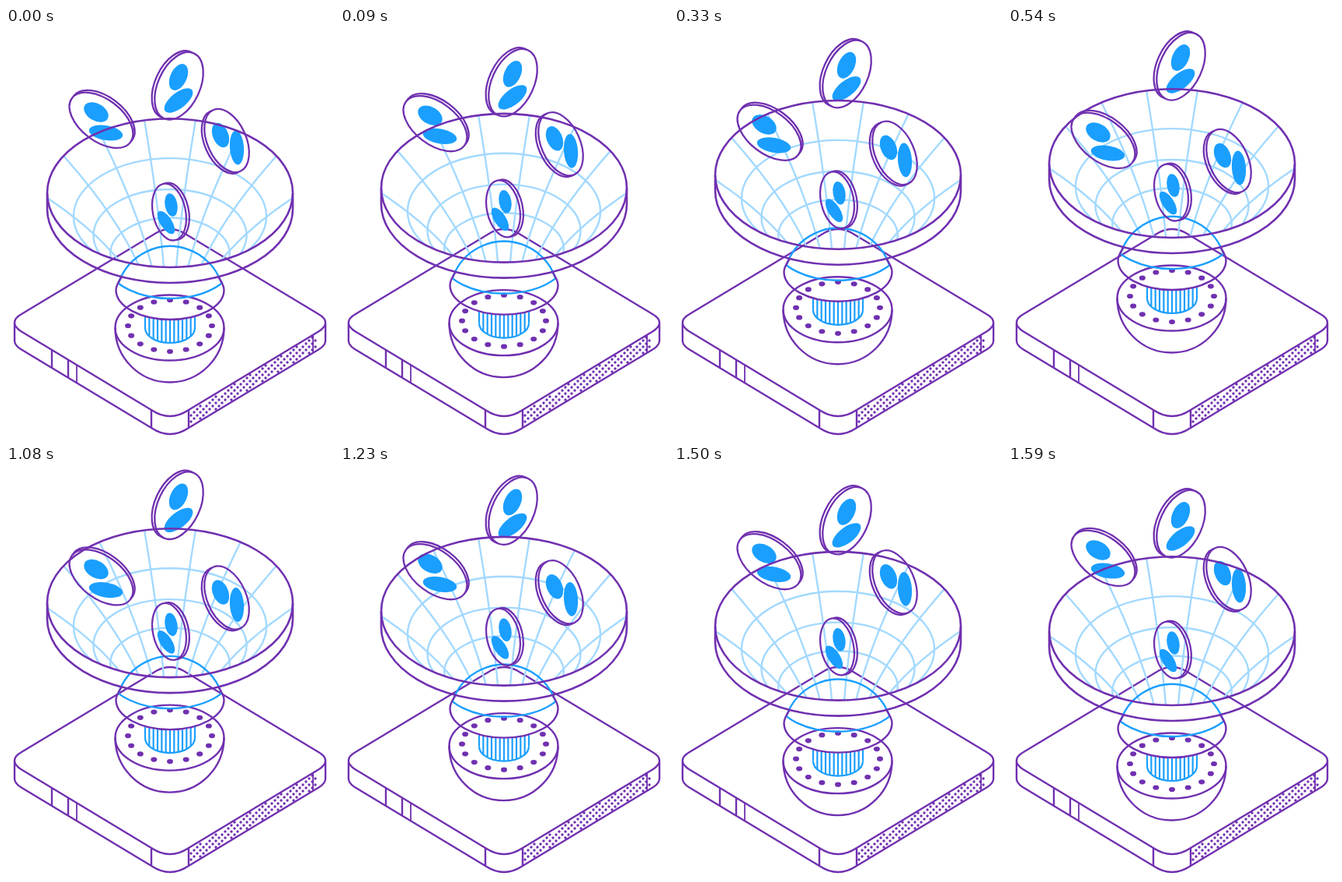
An HTML page with a canvas that plays this animation: 422 px wide and 526 px high, repeating every 1650 ms.

```html
<!DOCTYPE html>
<html lang="en">
<head>
<meta charset="utf-8">
<title>Data funnel</title>
<style>
html, body { margin: 0; width: 100%; height: 100%; overflow: hidden; background: #fff; }
canvas { display: block; width: 422px; height: 526px; }
</style>
</head>
<body>
<canvas id="stage"></canvas>
<script>
const W = 422, H = 526, LOOP = 1650, TICK = 30, STEPS = 18;
const PURPLE = '#7030b0', BLUE = '#1a9fff', PALE = '#a3d9ff';
const CX = 211, RIM_Y = 211.6, RAD = Math.PI / 180;

const canvas = document.getElementById('stage');
const ctx = canvas.getContext('2d');
const dpr = window.devicePixelRatio || 1;
canvas.width = W * dpr;
canvas.height = H * dpr;

// x, y, half length, half width, tilt in degrees; `depth` shifts the rear face along the short axis
const coins = [
  { face: [222.5, 74.3, 46, 27, -65], depth: -4, travel: -25,
    head: [222, 63, 18, 10.5, -65], body: [222, 93, 22, 10, -38] },
  { face: [122.5, 118.3, 47, 27, 37], depth: 3.6, travel: 26,
    head: [116, 108, 17, 11, 30], body: [128.5, 134.5, 22, 9.5, 10] },
  { face: [284, 144.5, 43, 25, 66], depth: -3.8, travel: 26,
    head: [276, 137.5, 16.5, 10, 68], body: [297, 153.5, 22, 9, 86] },
  { face: [210, 236, 37, 21, 78], depth: 4, travel: -25,
    head: [212.5, 227, 15, 8, 80], body: [206, 249.5, 17, 7.5, 57] }
];

function pen(color, width) {
  ctx.strokeStyle = color;
  ctx.lineWidth = width;
}

function line(x1, y1, x2, y2) {
  ctx.beginPath();
  ctx.moveTo(x1, y1);
  ctx.lineTo(x2, y2);
  ctx.stroke();
}

function arc(x, y, rx, ry, from = 0, to = 360) {
  ctx.beginPath();
  ctx.ellipse(x, y, rx, ry, 0, from * RAD, to * RAD);
  ctx.stroke();
}

function blob([x, y, a, b, tilt], color = BLUE) {
  ctx.fillStyle = color;
  ctx.beginPath();
  ctx.ellipse(x, y, a, b, tilt * RAD, 0, 2 * Math.PI);
  ctx.fill();
}

function drawPlate() {
  pen(PURPLE, 2.4);
  ctx.stroke(new Path2D(
    'M20 367 L194 262.5 Q211 253.5 228 262.5 L402 367 Q411 372 411 378 Q411 384 402 389.5' +
    ' L235 490 Q211 506 187 490 L20 389.5 Q11 384 11 378 Q11 372 20 367' +
    ' M11 378 V401 Q11 407 19 412 L187 513 Q211 529 235 513 L403 412 Q411 407 411 401 V378' +
    ' M187 490 V513 M235 490 V513 M59 413 V436 M80 426 V449'));
  pen(PURPLE, 1.8);
  line(91, 432, 91, 455);
  line(395, 394, 395, 416);
  // staggered dots inside the slanted right face
  for (let row = 0; row < 30; row++) {
    const y = 393 + row * 4;
    for (let x = 238 + (row % 2) * 4; x < 400; x += 8) {
      const depth = y - (490 - (x - 235) * 0.602);
      if (depth > 2.5 && depth < 21) blob([x, y, 1.7, 1.7, 0], PURPLE);
    }
  }
}

function drawGrid() {
  const radius = z => 158 * Math.exp(-z * (0.0073 + 0.000025 * z));
  ctx.save();
  ctx.beginPath();
  ctx.ellipse(CX, RIM_Y, 158, 95.4, 0, 0, 2 * Math.PI);
  ctx.clip();
  pen(PALE, 2.4);
  for (const z of [30, 54.5, 78]) arc(CX, RIM_Y + z, radius(z), radius(z) * 0.6);
  for (const angle of [12, 35, 60, 94]) {
    for (const side of [-1, 1]) {
      ctx.beginPath();
      for (let z = 0; z <= 136; z += 4) {
        const r = radius(z), a = angle * RAD * (1 - 0.0012 * z);
        ctx.lineTo(CX + side * r * Math.sin(a), RIM_Y + z - r * 0.6 * Math.cos(a));
      }
      ctx.stroke();
    }
  }
  ctx.restore();
}

function drawBeam() {
  pen(BLUE, 2.2);
  for (let i = 0; i <= 12; i++) {
    const dx = -32 + i * 16 / 3;
    const top = 334 + 40 * Math.sqrt(1 - (dx / 69.5) ** 2);
    const bottom = 385 + 19 * Math.sqrt(Math.max(0, 1 - (dx / 32) ** 2));
    line(CX + dx, top, CX + dx, bottom);
  }
  arc(CX, 385, 32, 19, 0, 180);
}

function drawBowl() {
  pen(PURPLE, 2.4);
  arc(210.5, 384.5, 70, 42);
  arc(210.5, 384.5, 70, 70, 0, 180);
  for (let i = 0; i < 16; i++) {
    const a = i * 22.5 * RAD;
    blob([CX + 54 * Math.cos(a), 382 + 33 * Math.sin(a), 4, 3.1, 0], PURPLE);
  }
}

function drawDome() {
  pen(BLUE, 2.4);
  arc(CX, 350, 70, 70, 199, 341);
  arc(CX, 296, 84.6, 51, 38.5, 141.5);
  pen(PURPLE, 2.4);
  ctx.stroke(new Path2D('M149 319 Q141.5 330 141.5 336 A69.5 38 0 0 0 280.5 336 Q280.5 330 273 319'));
}

function drawRim() {
  pen(PURPLE, 2.6);
  arc(CX, RIM_Y, 158, 95.4);
  ctx.stroke(new Path2D('M53 212 V232 A158 95 0 0 0 369 232 V212'));
}

function drawCoin({ face, depth, head, body, travel }, lift) {
  const [x, y, a, b, tilt] = face;
  const angle = tilt * RAD;
  const front = new Path2D(), outside = new Path2D(), rear = new Path2D();
  front.ellipse(x, y, a, b, angle, 0, 2 * Math.PI);
  rear.ellipse(x + depth * Math.sin(angle) * Math.sign(tilt), y - depth * Math.cos(angle) * Math.sign(tilt),
    a, b, angle, 0, 2 * Math.PI);
  outside.rect(-W, -H, 3 * W, 3 * H);
  outside.addPath(front);
  ctx.save();
  ctx.translate(0, travel * lift);
  blob(head);
  blob(body);
  pen(PURPLE, 2.3);
  ctx.stroke(front);
  ctx.clip(outside, 'evenodd');
  ctx.stroke(rear);
  ctx.restore();
}

// 0 at rest, 1 when the funnel is fully raised
function liftAt(t) {
  const up = Math.min(STEPS, Math.floor(t / TICK));
  const down = t < 1080 ? 0 : Math.min(STEPS, Math.floor((t - 1080) / TICK) + 1);
  return (up - down) / STEPS;
}

function frame(now) {
  const lift = liftAt(now % LOOP);
  ctx.setTransform(dpr, 0, 0, dpr, 0, 0);
  ctx.fillStyle = '#fff';
  ctx.fillRect(0, 0, W, H);
  drawPlate();

  ctx.save();
  ctx.translate(0, -38 * lift);
  drawGrid();
  drawBowl();
  drawBeam();
  drawDome();
  ctx.restore();

  for (const coin of coins) drawCoin(coin, lift);

  ctx.save();
  ctx.translate(0, -38 * lift);
  drawRim();
  ctx.restore();
  requestAnimationFrame(frame);
}

frame(0);
</script>
</body>
</html>
```
